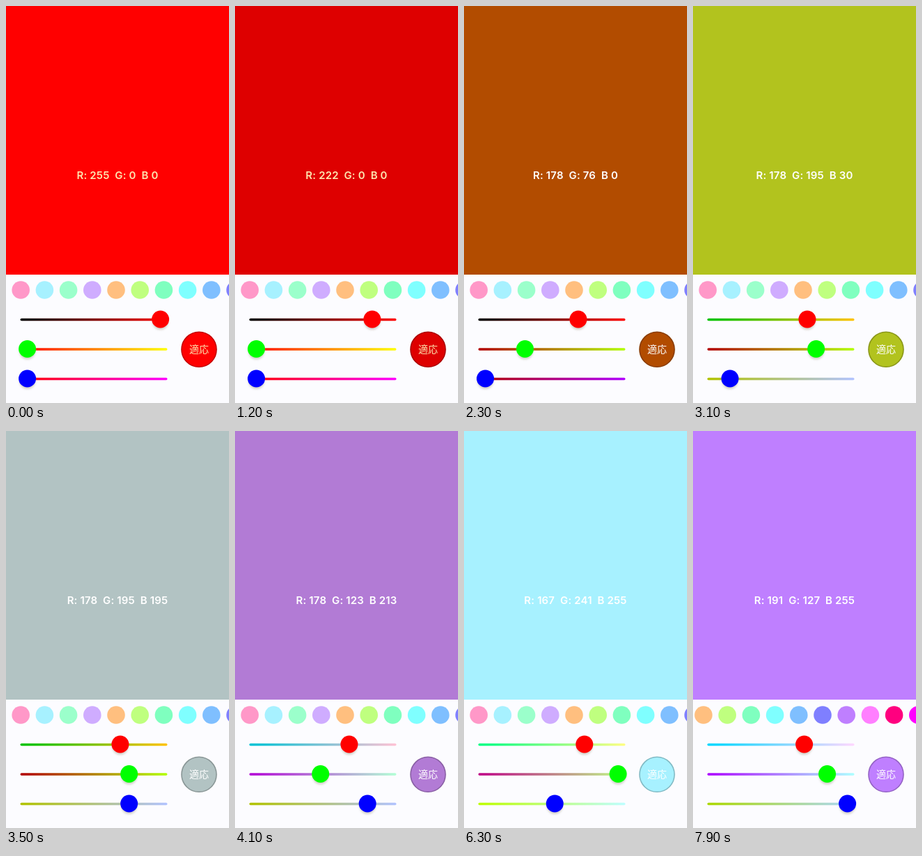
Animation, 320 px wide and 569 px high, one loop 8000 ms. Source, as an HTML page:

```html
<!DOCTYPE html>
<html lang="ja">
<head>
<meta charset="utf-8">
<title>Color mixer</title>
<style>
html, body { margin: 0; width: 100%; height: 100%; overflow: hidden; }
svg { display: block; width: 100vw; height: 100vh; }
text { text-anchor: middle; white-space: pre; }
#label { font: 600 15px Inter, Roboto, sans-serif; letter-spacing: .15px; }
#apply { font: 400 14px "Noto Sans CJK JP", "Noto Sans CJK", sans-serif; }
</style>
</head>
<body>
<svg viewBox="0 0 320 569" preserveAspectRatio="none">
  <defs id="defs">
    <filter id="soft" x="-50%" y="-50%" width="200%" height="200%">
      <feGaussianBlur stdDeviation="1.7"/>
    </filter>
  </defs>
  <rect id="screen" width="320" height="386"/>
  <text id="label" x="160" y="247.5"></text>
  <rect y="385" width="320" height="184" fill="#fcfcff"/>
  <g id="swatches"></g>
  <g id="sliders"></g>
  <circle id="button" cx="277" cy="492.3" r="25" stroke-width="1.6"/>
  <text id="apply" x="277" y="497">適応</text>
</svg>
<script>
const LOOP = 8000, STEP = 100;
const SWATCHES = ['#ff98c8', '#a7f1ff', '#9bffcb', '#cfacff', '#ffbf7f', '#bfff7f', '#7fffbf',
  '#7fffff', '#7fbfff', '#7f7fff', '#bf7fff', '#ff7fff', '#ff007f', '#ff00ff'];
const KNOBS = ['#f00', '#0f0', '#00f'];
const START = [255, 0, 0];

const smooth = u => u * u * (3 - 2 * u);
const easeOut = u => 1 - (1 - u) ** 1.793;

// Drags of one channel: [channel, start, end, final value, easing]
const DRAGS = [
  [0, 700, 1800, 178, smooth],
  [1, 1800, 2970, 195, smooth],
  [2, 2940, 3620, 213, smooth],
  [1, 3720, 4600, 82, easeOut]
];
// Taps on a swatch: [time, colour]
const TAPS = [
  [5300, [191, 255, 127]],
  [6300, [167, 241, 255]],
  [7800, [191, 127, 255]]
];
const SCROLL = { at: 7000, by: 143 };

const $ = id => document.getElementById(id);
const clamp = u => Math.max(0, Math.min(1, u));
const mix = (a, b, u) => a + (b - a) * u;

function add(parent, tag, attrs) {
  const el = document.createElementNS('http://www.w3.org/2000/svg', tag);
  for (const k in attrs) el.setAttribute(k, attrs[k]);
  return parent.appendChild(el);
}

const css = c => `rgb(${c.map(Math.round).join()})`;
const withChannel = (c, i, v) => c.map((x, k) => k === i ? v : x);

SWATCHES.forEach((fill, i) =>
  add($('swatches'), 'circle', { cx: 21.2 + i * 34.2, cy: 407, r: 12.8, fill }));

const sliders = KNOBS.map((fill, i) => {
  const y = 449.5 + i * 42.5;
  const grad = add($('defs'), 'linearGradient',
    { id: 'track' + i, gradientUnits: 'userSpaceOnUse', x1: 21, x2: 231, y1: 0, y2: 0 });
  const stops = [0, 1].map(offset => add(grad, 'stop', { offset }));
  add($('sliders'), 'rect',
    { x: 20.5, y: y - 1.75, width: 211, height: 3.5, rx: 1.75, fill: `url(#track${i})` });
  const knob = add($('sliders'), 'g', {});
  add(knob, 'circle', { cy: y + 3, r: 11.5, fill: '#c6c3b8', opacity: .75, filter: 'url(#soft)' });
  add(knob, 'circle', { cy: y - .5, r: 12.5, fill });
  return { stops, knob };
});

// Sliders, tracks and chosen colour at time t
function stateAt(t) {
  let values = START.slice(), tracks = START.slice(), chosen;
  for (const [ch, from, to, end, ease] of DRAGS) {
    if (t < from) continue;
    values[ch] = Math.round(mix(values[ch], end, ease(clamp((t - from) / (to - from)))));
    if (t >= to) tracks[ch] = end;
  }
  chosen = values;
  for (const [at, color] of TAPS) {
    if (t < at) continue;
    const u = clamp((t - at + STEP) / 400) ** 2.2;
    values = values.map((v, i) => mix(v, color[i], u));
    tracks = values;
    chosen = color;
  }
  return { values, tracks, chosen };
}

function draw(t) {
  const { values, tracks, chosen } = stateAt(t);
  const ink = chosen[1] < 60 ? '#fde6b0' : '#fff';

  $('screen').setAttribute('fill', css(chosen));
  $('label').setAttribute('fill', ink);
  $('label').textContent = `R: ${chosen[0]}  G: ${chosen[1]}  B ${chosen[2]}`;
  $('button').setAttribute('fill', css(chosen));
  $('button').setAttribute('stroke', css(chosen.map(v => v * .77)));
  $('apply').setAttribute('fill', ink);

  sliders.forEach(({ stops, knob }, i) => {
    stops.forEach((s, k) => s.setAttribute('stop-color', css(withChannel(tracks, i, k * 255))));
    knob.setAttribute('transform', `translate(${30.6 + 191 * values[i] / 255} 0)`);
  });

  const u = t < SCROLL.at ? 0 : clamp((t - SCROLL.at + STEP) / 400);
  $('swatches').setAttribute('transform', `translate(${-SCROLL.by * (1 - (1 - u) ** 2)} 0)`);
}

const began = performance.now();
function tick() {
  const t = (performance.now() - began) % LOOP;
  draw(Math.floor(t / STEP) * STEP);
  requestAnimationFrame(tick);
}
tick();
</script>
</body>
</html>
```
